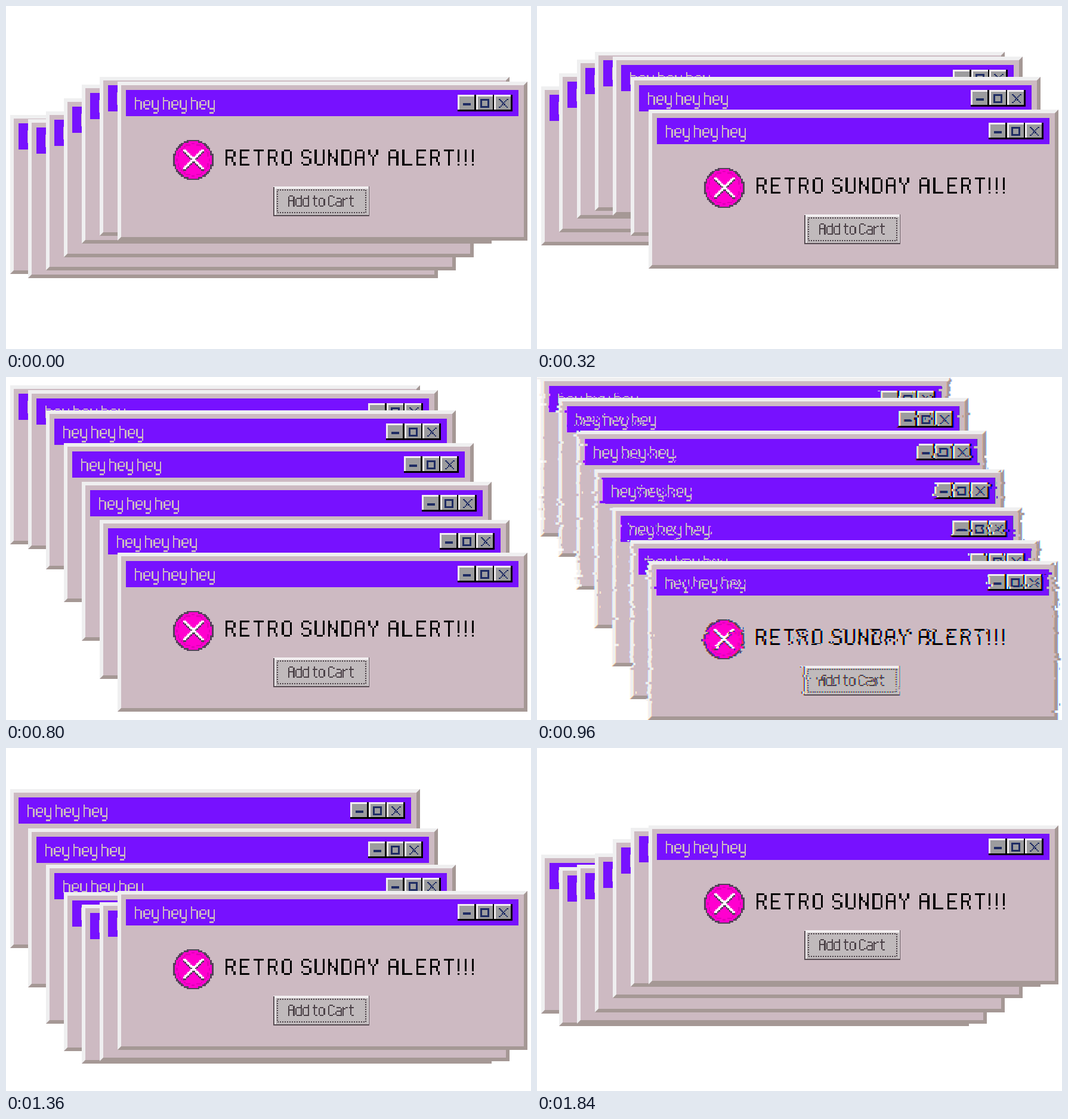
These frames come from a looping animation (880 px wide and 576 px high, 1.88 s). An HTML page with a canvas:

```html
<!DOCTYPE html>
<html lang="en">
<head>
<meta charset="utf-8">
<title>hey hey hey</title>
<style>
html, body { margin: 0; width: 100%; height: 100%; overflow: hidden; background: #fff; }
canvas { display: block; width: 880px; height: 576px; }
</style>
</head>
<body>
<canvas id="stage" width="880" height="576" role="img" aria-label="hey hey hey: RETRO SUNDAY ALERT!!! Add to Cart"></canvas>
<script>
const W = 880, H = 576, LOOP = 1880, STEP = 80;
const ctx = document.getElementById('stage').getContext('2d', { willReadFrequently: true });

// Pixel lettering: strokes through column/row points, "/" lifts the pen.
const GLYPHS = {
  A: '08 01 10 30 41 48/04 44',
  C: '41 30 10 01 07 18 38 47',
  D: '00 08 38 47 41 30 00',
  E: '40 00 08 48/04 34',
  L: '00 08 48',
  N: '08 00/01 47/48 40',
  O: '10 30 41 47 38 18 07 01 10',
  R: '08 00 30 41 43 34 04/24 48',
  S: '41 30 10 01 03 14 34 45 47 38 18 07',
  T: '00 40/20 28',
  U: '00 07 18 38 47 40',
  Y: '00 02 24 42 40/24 28',
  '!': '00 06/08',
  a: '12 32 43 48 18 07 06 15 45',
  d: '40 48 18 07 03 12 42',
  e: '05 45 43 32 12 03 07 18 38',
  h: '00 08/03 12 32 43 48',
  o: '12 32 43 47 38 18 07 03 12',
  r: '02 08/04 22 32',
  t: '10 17 28 38/02 32',
  y: '02 07 18 48/42 4a 3b 1b'
};
const NARROW = { r: 5, t: 5 };

// Rectangle given by its corners, snapped to whole pixels.
function box(x0, y0, x1, y1, color) {
  const x = Math.round(x0), y = Math.round(y0);
  ctx.fillStyle = color;
  ctx.fillRect(x, y, Math.round(x1) - x, Math.round(y1) - y);
}

function poly(color, ...pts) {
  ctx.fillStyle = color;
  ctx.beginPath();
  pts.forEach(([x, y]) => ctx.lineTo(x, y));
  ctx.fill();
}

function stroke(points, dot) {
  let [px, py] = points[0];
  dot(px, py);
  for (const [x, y] of points) {
    const n = Math.max(Math.abs(x - px), Math.abs(y - py));
    for (let k = 1; k <= n; k++) {
      dot(Math.round(px + (x - px) * k / n), Math.round(py + (y - py) * k / n));
    }
    [px, py] = [x, y];
  }
}

function word(str, x, y, ux, uy, gap, color) {
  for (const ch of str) {
    for (const part of GLYPHS[ch].split('/')) {
      const points = part.split(' ').map(p => [...p].map(c => parseInt(c, 16)));
      stroke(points, (c, r) =>
        box(x + c * ux, y + r * uy, x + (c + 1) * ux, y + (r + 1) * uy, color));
    }
    x += (NARROW[ch] || gap) * ux;
  }
}

function bevel(x0, y0, x1, y1, b, light, dark) {
  poly(light, [x0, y0], [x1, y0], [x1 - b, y0 + b], [x0 + b, y0 + b], [x0 + b, y1 - b], [x0, y1]);
  poly(dark, [x1, y1], [x0, y1], [x0 + b, y1 - b], [x1 - b, y1 - b], [x1 - b, y0 + b], [x1, y0]);
}

function titleButtons() {
  const navy = '#1f2c64';
  for (let k = 0; k < 3; k++) {
    const x = Math.round(570 + k * 30.7);
    box(x, 22, x + 31, 50, '#000');
    box(x, 22, x + 28, 47, '#f2eef0');
    box(x + 3, 25, x + 28, 47, '#9c9c9e');
  }
  box(579, 36, 592, 40, navy);
  box(608, 29, 623, 44, navy);
  box(611, 32, 620, 41, '#9c9c9e');
  for (let k = 0; k < 7; k++) {
    const x = 639 + k * 2.1, y = 29 + k * 2.1;
    box(x, y, x + 2.5, y + 2.1, navy);
    box(652 - k * 2.1, y, 654.5 - k * 2.1, y + 2.1, navy);
  }
}

function icon() {
  const u = 2.6, n = 26, left = 93, top = 97.6;
  for (let r = 0; r < n; r++) {
    for (let c = 0; c < n; c++) {
      const d = Math.hypot(c - 12.5, r - 12.5);
      if (d > 13) continue;
      const color = d > 11.9 ? '#54405a' : d > 9.7 && d < 10.6 ? '#e000b8' : '#ff00cf';
      box(left + c * u, top + r * u, left + (c + 1) * u, top + (r + 1) * u, color);
    }
  }
  const cross = (dx, dy, color) => {
    for (let k = 0; k < 13; k++) {
      const y = 113.5 + dy + k * 2.5;
      box(109.5 + dx + k * 2.5, y, 114.5 + dx + k * 2.5, y + 3, color);
      box(139.5 + dx - k * 2.5, y, 144.5 + dx - k * 2.5, y + 3, color);
    }
  };
  cross(0, 3, '#54405a');
  cross(0, 0, '#fff');
}

function cartButton(pressed) {
  const dark = '#574b52', light = '#f3eff1';
  box(261, 176, 422, 226, pressed ? light : dark);
  box(261, 176, 421, 224, pressed ? dark : light);
  box(261, 177, 263, 225, dark);
  box(263, 178, 420, 224, light);
  box(265, 180, 420, 224, pressed ? '#e1dac8' : '#c0babc');
  ctx.strokeStyle = '#4b4147';
  ctx.lineWidth = 2;
  ctx.setLineDash([2, 2]);
  ctx.strokeRect(268, 182, 148, 38);
  ctx.setLineDash([]);
  const put = (s, x) => word(s, x, 191, 2.1, 2.08, 5.8, '#4b4147');
  put('Add', 286);
  put('to', 326.5);
  put('Cart', 353);
}

function popup(x, y, pressed) {
  ctx.setTransform(1, 0, 0, 1, Math.round(x), Math.round(y));
  box(0, 0, 687, 267, '#cdbac2');
  bevel(0, 0, 687, 267, 6, '#efeff0', '#a59895');
  box(14, 14, 672, 58, '#7711ff');
  for (let k = 0; k < 3; k++) word('hey', 29 + k * 47, 26, 2.37, 2.3, 6, '#cdbac2');
  titleButtons();
  icon();
  const put = (s, x, gap) => word(s, x, 114, 3.3, 2.95, gap, '#000');
  put('RETRO', 181, 7.15);
  put('SUNDAY', 308, 6.8);
  put('ALERT', 454, 7.05);
  put('!!!', 570, 3.6);
  cartButton(pressed);
}

// Height of the wave: eased fall and rise over 1920 ms.
function wave(t) {
  const s = Math.abs((t % 1920) / 960 - 1);
  return 0.5 + 182.2 * s * s * (3 - 2 * s);
}

function hash(a, b, c) {
  const v = Math.sin(a * 127.1 + b * 311.7 + c * 74.7) * 43758.5453;
  return v - Math.floor(v);
}

// Tears short row pieces sideways and splits the colour channels.
function tear(seed) {
  const img = ctx.getImageData(0, 0, W, H), out = img.data, src = out.slice();
  for (let y = 0; y < H; y++) {
    const row = Math.floor(y / 4);
    for (let x = 0; x < W; x++) {
      const col = Math.floor((x + row % 3 * 5) / 15);
      const torn = hash(col, row, seed) < 0.2;
      const shift = torn ? Math.round(hash(row, col, seed + 5) * 12 - 6) : 0;
      for (let ch = 0; ch < 3; ch++) {
        const sx = Math.min(W - 1, Math.max(0, x + shift + ch));
        out[(y * W + x) * 4 + ch] = src[(y * W + sx) * 4 + ch];
      }
    }
  }
  ctx.putImageData(img, 0, 0);
}

const TEARS = [[440, 520], [960, 1160], [1200, 1240]];
const within = (t, [from, to]) => t >= from && t < to;

function draw(t, torn) {
  ctx.setTransform(1, 0, 0, 1, 0, 0);
  ctx.fillStyle = '#fff';
  ctx.fillRect(0, 0, W, H);
  const pressed = within(t, [560, 800]);
  for (let i = 0; i < 7; i++) {
    popup(7.3 + 29.9 * i, 21 * i + wave(t + 160 * i), pressed);
  }
  if (torn) tear(t / STEP);
}

const start = performance.now();
let shown = '';
function tick() {
  const t = (performance.now() - start) % LOOP;
  const step = Math.floor(t / STEP) * STEP;
  const torn = TEARS.some(span => within(t, span));
  const key = step + ':' + torn;
  if (key !== shown) {
    shown = key;
    draw(step, torn);
  }
  requestAnimationFrame(tick);
}
tick();
</script>
</body>
</html>
```
